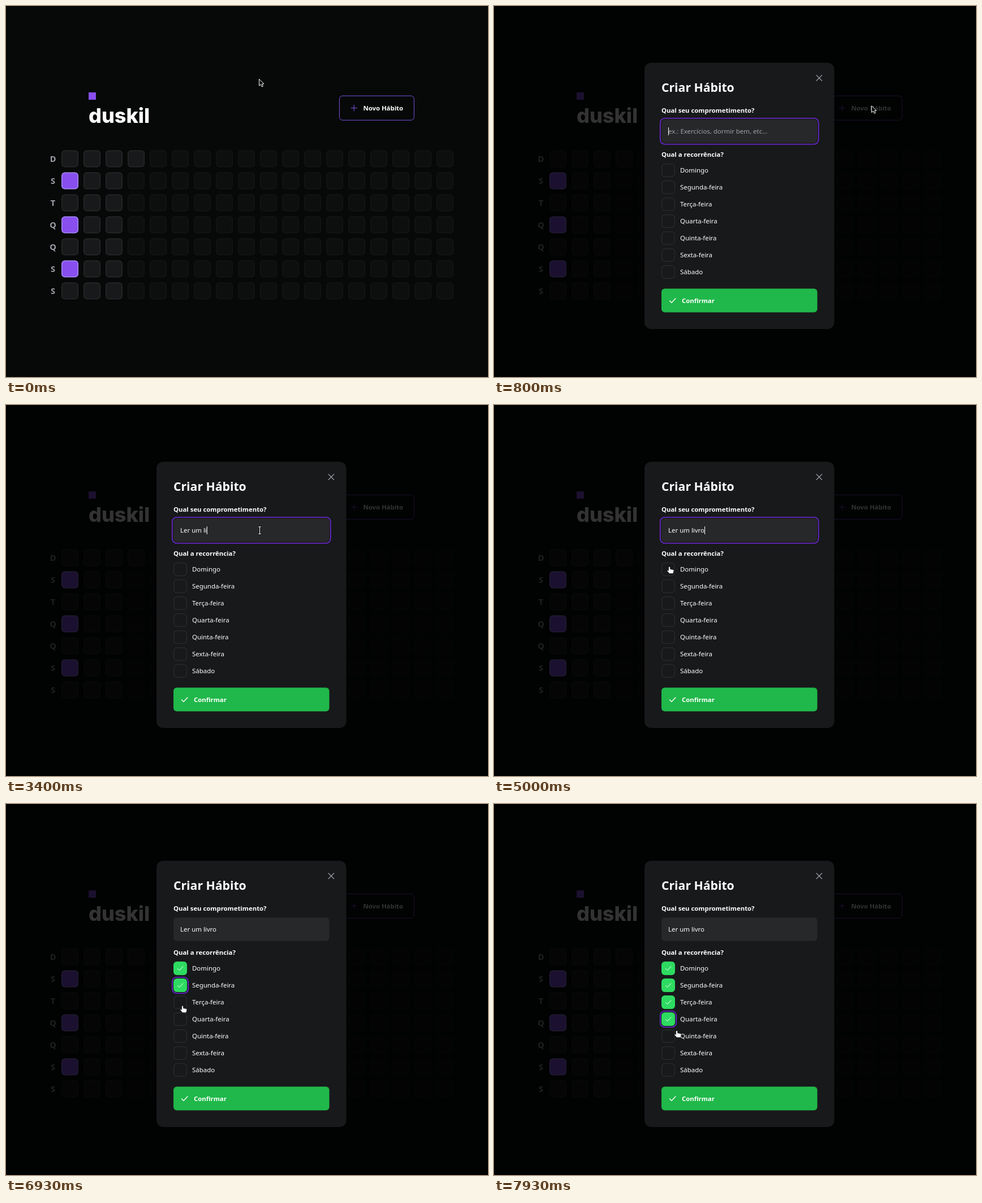
Write an HTML page that moves like this. It is 852 by 657 pixels and loops after 8000 ms.

```html
<!DOCTYPE html>
<html lang="pt-BR">
<head>
<meta charset="utf-8">
<title>Criar Hábito</title>
<style>
html, body { margin: 0; width: 100%; height: 100%; overflow: hidden; background: #070908; }
svg { display: block; width: 100%; height: 100%; }
text { font: 11.45px "Noto Sans", "Open Sans", sans-serif; fill: #fff; white-space: pre; }
text.b { font-weight: 700; font-size: 11.35px; }
text.h { font-weight: 700; font-size: 21.2px; }
text.day { font-weight: 700; font-size: 14.5px; fill: #a1a1aa; text-anchor: middle; }
text.brand { font: 800 36px Inter, sans-serif; }
.line { fill: none; stroke-linecap: round; stroke-linejoin: round; }
.ring { fill: none; stroke: #6d28d9; stroke-width: 1.6; }
</style>
</head>
<body>
<svg id="stage" viewBox="0 0 852 657"></svg>
<script>
const TICK = 1000 / 15, LOOP = 8000;
const PHRASE = 'Ler um livro';
const KEYS = [26, 29, 30, 33, 41, 41, 45, 48, 51, 53, 54, 56];
const PRESSES = [77, 100, 107, 113];
const OPEN = 12;
const DAYS = ['Domingo', 'Segunda-feira', 'Terça-feira', 'Quarta-feira', 'Quinta-feira', 'Sexta-feira', 'Sábado'];

// Pointer path: tick, x, y
const PATH = [
  [3, 447, 129], [9, 667, 176.3], [12, 667, 176.3], [16, 556, 187], [17, 556, 187],
  [21, 448.5, 222], [64, 448.5, 222], [74, 310, 286], [80, 310, 286], [84, 313, 291],
  [87, 313, 291], [88, 311, 288], [89, 312, 297], [90, 312, 297], [92, 312, 317],
  [93, 312, 317], [95, 311, 322], [102, 311, 322], [104, 312, 357], [105, 312, 357],
  [106, 312, 353], [109, 312, 353], [112, 311, 381], [116, 311, 381], [118, 316, 390],
  [119, 323, 401]
];

const rect = (x, y, w, h, r, attrs) =>
  `<rect x="${x}" y="${y}" width="${w}" height="${h}" rx="${r}" ${attrs}/>`;
const text = (x, y, s, cls = '', attrs = '') =>
  `<text x="${x}" y="${y}" class="${cls}" ${attrs}>${s}</text>`;
const line = (d, color, width, attrs = '') =>
  `<path class="line" d="${d}" stroke="${color}" stroke-width="${width}" ${attrs}/>`;
const ring = (x, y, w, h, attrs) =>
  rect(x - 2.2, y - 2.2, w + 4.4, h + 4.4, 8, `class="ring" ${attrs}`);
const rowY = i => 279 + 30 * i;

function grid() {
  let out = '';
  [...'DSTQQSS'].forEach((d, r) => {
    const y = 255.5 + 39 * r;
    out += text(83, y + 20.2, d, 'day');
    for (let c = 0; c < 18; c++) {
      const done = c === 0 && r % 2 && r < 6;
      const past = c < 3 || (c === 3 && r === 0);
      const paint = done ? 'fill="#884fee" stroke="#a78bfa"' : 'fill="#18191b" stroke="#27282a"';
      out += rect(98.75 + 39 * c, y + .75, 28.5, 28.5, 5.25,
        `${paint} stroke-width="1.5" opacity="${past ? 1 : .4}"`);
    }
  });
  return out;
}

const page = rect(146, 153, 13, 13, 0, 'fill="#884fee"')
  + text(146, 207, 'duskil', 'brand')
  + rect(589.4, 159.1, 131.9, 43.1, 5.6, 'id="button" fill="#070908" stroke-width=".9"')
  + ring(589, 158.7, 132.7, 43.9, 'id="buttonRing"')
  + line('M610 180.7h10.3m-5.15 -5.15v10.3', '#8b5cf6', .95)
  + text(631.5, 185, 'Novo Hábito', 'b')
  + grid();

const options = DAYS.map((d, i) => {
  const y = rowY(i);
  return rect(296.75, y + .75, 22.5, 22.5, 5.25, 'fill="#18191b" stroke="#28292c" stroke-width="1.5"')
    + `<g id="tick${i}">` + rect(296, y, 24, 24, 6, 'fill="#2edb61"')
    + line(`M303.5 ${y + 12.5}l3 3 6.5 -6.8`, '#fff', 1) + '</g>'
    + text(329, y + 16, d);
}).join('');

const modal = '<g id="modal">'
  + rect(0, 0, 852, 657, 0, 'fill="#000" fill-opacity=".8"')
  + rect(266, 100.5, 335.5, 471.5, 12, 'fill="#18191b"')
  + line('M570 122.7l9.6 9.6m0 -9.6l-9.6 9.6', '#b0b0b8', 1.15)
  + text(296, 151.5, 'Criar Hábito', 'h')
  + text(296, 188.5, 'Qual seu comprometimento?', 'b')
  + rect(296, 201, 275.5, 41.5, 6, 'fill="#27282a"')
  + ring(296, 201, 275.5, 41.5, 'id="inputRing"')
  + text(308, 226, 'ex.: Exercícios, dormir bem, etc...', '', 'id="hint" style="fill:#a1a1aa"')
  + text(308, 226, '', '', 'id="typed"')
  + rect(308, 215, 1, 14, 0, 'id="caret" fill="#fff"')
  + text(296, 266.5, 'Qual a recorrência?', 'b')
  + options
  + ring(296, 0, 24, 24, 'id="boxRing"')
  + rect(296, 500.5, 275.5, 42, 6, 'fill="#20b84a"')
  + line('M310.5 522l3.4 3.4 7 -7.4', '#fff', 1.4)
  + text(332, 525.5, 'Confirmar', 'b')
  + '</g>';

const pointers = '<g id="pointer">'
  + '<path id="arrow" d="M.5 .5V12.2L3.3 9.8L5.3 14L7.3 13.1L5.4 9H9Z" fill="#000" stroke="#fff" stroke-width="1" stroke-linejoin="round"/>'
  + '<path id="hand" d="M-1.4 1.2Q0 -.8 1.4 1.2V4.6L6.6 5.6Q8 6 7.8 7.6L6.6 12.6H.2L-4 8Q-4 6 -2.5 6.6L-1.4 7.6Z" fill="#fff" stroke="#000" stroke-width=".6"/>'
  + '<g id="beam">' + line('M-2.3 -6.3H2.3M0 -6.3V6.3M-2.3 6.3H2.3', '#000', 2.6)
  + line('M-2.3 -6.3H2.3M0 -6.3V6.3M-2.3 6.3H2.3', '#fff', 1.1) + '</g></g>';

const stage = document.getElementById('stage');
stage.innerHTML = page + modal + pointers;

const el = id => document.getElementById(id);
const show = (id, on) => el(id).setAttribute('visibility', on ? 'inherit' : 'hidden');

function pointerAt(k) {
  const i = PATH.findIndex(p => p[0] >= k);
  if (i === 0) return PATH[0].slice(1);
  const [k0, x0, y0] = PATH[i - 1], [k1, x1, y1] = PATH[i];
  const u = (k - k0) / (k1 - k0), s = u * u * (3 - 2 * u);
  return [x0 + (x1 - x0) * s, y0 + (y1 - y0) * s];
}

function pointerKind(x, y, open) {
  if (!open) return x > 589 && y > 159 ? 'hand' : 'arrow';
  if (x < 571 && y > 201 && y < 243) return 'beam';
  return x < 420 && y >= 279 && (y - 279) % 30 <= 24 ? 'hand' : 'arrow';
}

function draw(k) {
  const open = k >= OPEN;
  const [x, y] = pointerAt(k);
  const kind = pointerKind(x, y, open);
  el('pointer').setAttribute('transform', `translate(${x} ${y})`);
  for (const id of ['arrow', 'hand', 'beam']) show(id, id === kind);

  el('button').setAttribute('stroke', !open && kind === 'hand' ? '#c4b5fd' : '#8b5cf6');
  show('buttonRing', k >= 10 && !open);
  show('modal', open);

  const count = KEYS.filter(t => t <= k).length;
  const typed = el('typed');
  typed.textContent = PHRASE.slice(0, count);
  show('hint', open && !count);
  const focused = open && k < PRESSES[0];
  const idle = k - (count ? KEYS[count - 1] : OPEN);
  show('inputRing', focused);
  show('caret', focused && Math.floor(idle / 9) % 2 === 0);
  el('caret').setAttribute('x', 308 + (count ? typed.getComputedTextLength() : 0));

  const pressed = PRESSES.filter(t => t <= k).length;
  show('boxRing', pressed > 0);
  el('boxRing').setAttribute('y', rowY(pressed - 1) - 2.2);
  DAYS.forEach((_, i) => {
    const u = i < PRESSES.length ? (k - PRESSES[i]) / 2.5 : 0;
    el('tick' + i).setAttribute('opacity', Math.max(0, Math.min(1, u)));
  });
}

function frame() {
  draw(Math.floor((performance.now() % LOOP + 4) / TICK) % 120);
  requestAnimationFrame(frame);
}
frame();
</script>
</body>
</html>
```
